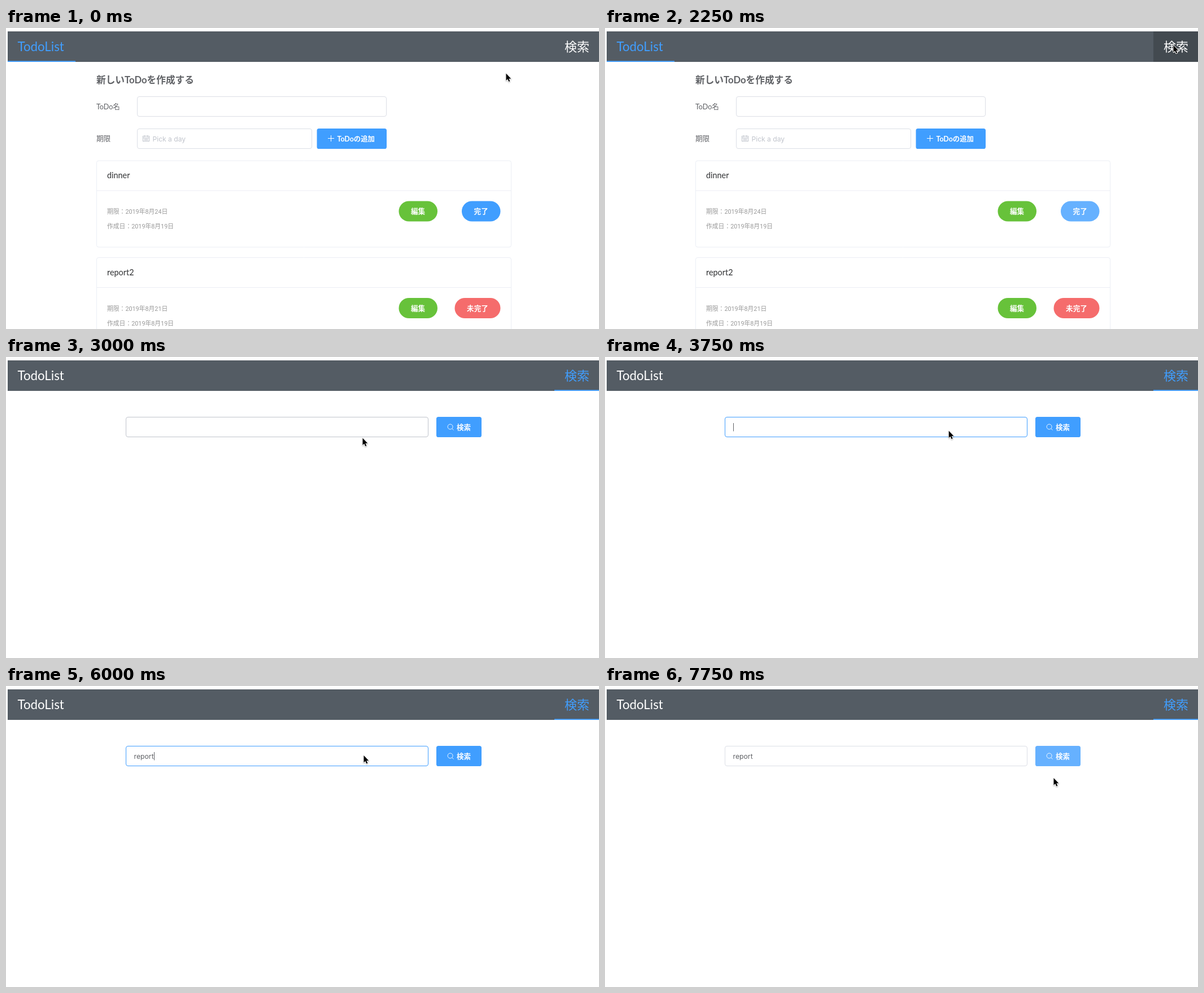
Write an HTML page with a canvas that moves like this. It is 1050x533 px and loops after 8 s.

```html
<!DOCTYPE html>
<html lang="ja">
<head>
<meta charset="utf-8">
<title>TodoList</title>
<style>
html, body { margin: 0; width: 100%; height: 100%; overflow: hidden; background: #fff; }
canvas { display: block; width: 1050px; height: 533px; }
</style>
</head>
<body>
<canvas id="stage" width="1050" height="533"></canvas>
<script>
const ctx = document.getElementById('stage').getContext('2d');
const LOOP = 8000, STEP = 250;

const CJK = '"Noto Sans CJK JP", "Noto Sans CJK", sans-serif';
const UI = 'Lato, ' + CJK;
const NUM = 'Roboto, ' + CJK;
const FIELD = 'Inter, ' + CJK;

const BLUE = '#409eff', LIGHT_BLUE = '#66b1ff', DARK_BLUE = '#3a8ee6';
const GREEN = '#67c23a', RED = '#f56c6c';
const BAR = '#545c64', BAR_HOVER = '#434a50';
const LINE = '#dcdfe6', LINE_HOVER = '#c0c4cc', CARD = '#ebeef5';
const INK = '#606266', DIM = '#999999';

// Pointer path: time, x, y
const PATH = [
  [250, 885.5, 80.5], [1500, 1003.5, 41.5], [2000, 1006.5, 30.5],
  [2500, 1006.5, 30.5], [2750, 990, 29.5], [3000, 631.5, 143.5],
  [3500, 612, 128], [4000, 605.5, 133.5], [5750, 605.5, 133.5],
  [6000, 633.5, 123], [6500, 798, 127], [6750, 799, 129],
  [7000, 796, 143], [7250, 796, 143], [7750, 794.5, 163]
];

function pointer(t) {
  const next = PATH.findIndex(p => p[0] > t);
  if (next === 0) return PATH[0].slice(1);
  if (next < 0) return PATH[PATH.length - 1].slice(1);
  const [t0, x0, y0] = PATH[next - 1], [t1, x1, y1] = PATH[next];
  const u = (t - t0) / (t1 - t0), k = u * u * (3 - 2 * u);
  return [x0 + (x1 - x0) * k, y0 + (y1 - y0) * k];
}

function text(str, x, y, size, color, family = UI, weight = 400) {
  ctx.font = `${weight} ${size}px ${family}`;
  ctx.fillStyle = color;
  ctx.fillText(str, x, y);
}

function rect(x, y, w, h, color) {
  ctx.fillStyle = color;
  ctx.fillRect(x, y, w, h);
}

function pill(x, y, w, h, r, color) {
  ctx.beginPath();
  ctx.roundRect(x, y, w, h, r);
  ctx.fillStyle = color;
  ctx.fill();
}

function frame(x, y, w, h, color) {
  ctx.beginPath();
  ctx.roundRect(x + 0.5, y + 0.5, w - 1, h - 1, 3.5);
  ctx.strokeStyle = color;
  ctx.lineWidth = 1;
  ctx.stroke();
}

function strokes(color, width, ...lines) {
  ctx.strokeStyle = color;
  ctx.lineWidth = width;
  ctx.beginPath();
  for (const [x0, y0, x1, y1] of lines) {
    ctx.moveTo(x0, y0);
    ctx.lineTo(x1, y1);
  }
  ctx.stroke();
}

function header(search, hover) {
  rect(3, 6, 1047, 54, BAR);
  if (hover) rect(971, 6, 79, 54, BAR_HOVER);
  if (search) rect(971, 58.2, 79, 1.8, BLUE);
  else rect(3, 58.2, 120, 1.8, BLUE);
  text('TodoList', 20.5, 41, 22.3, search ? '#fff' : BLUE);
  text('検索', 989, 41, 22, search ? BLUE : '#fff');
}

function calendar(x, y) {
  ctx.strokeStyle = LINE_HOVER;
  ctx.lineWidth = 1;
  ctx.strokeRect(x + 0.5, y + 1.5, 11, 9);
  strokes(LINE_HOVER, 1, [x, y + 4.5, x + 12, y + 4.5],
    [x + 3.5, y, x + 3.5, y + 3], [x + 8.5, y, x + 8.5, y + 3],
    [x + 2.5, y + 6.5, x + 9.5, y + 6.5], [x + 2.5, y + 8.5, x + 9.5, y + 8.5]);
}

function card(y, title, due, label, x, color) {
  frame(160, y, 735, 154, CARD);
  rect(161, y + 53, 733, 1, CARD);
  text(title, 179, y + 31.5, 14.4, '#303133');
  text('期限：' + due, 179, y + 94.5, 10.8, DIM, NUM);
  text('作成日：2019年8月19日', 179, y + 120.5, 10.8, DIM, NUM);
  pill(695.5, y + 72, 68.5, 36, 18, GREEN);
  text('編集', 717, y + 94.5, 12.6, '#fff', UI, 700);
  pill(x, y + 72, 875.5 - x, 36, 18, color);
  text(label, x + 21.6, y + 94.5, 12.6, '#fff', UI, 700);
}

function listPage(t) {
  text('新しいToDoを作成する', 160, 98, 16.7, INK, UI, 700);
  text('ToDo名', 160, 143.5, 12.5, INK);
  frame(232, 121, 442, 36, LINE);
  text('期限', 160, 200, 12.6, INK);
  frame(232, 178, 310, 36, LINE);
  calendar(242, 190);
  text('Pick a day', 259.5, 200.5, 12.1, LINE_HOVER, FIELD);
  pill(550.5, 178, 123.5, 36, 3.6, BLUE);
  strokes('#fff', 1, [570, 195.5, 581, 195.5], [575.5, 190, 575.5, 201]);
  text('ToDoの追加', 586.5, 200.5, 12.4, '#fff', UI, 700);
  card(234.5, 'dinner', '2019年8月24日', '完了', 807, t < 500 ? BLUE : LIGHT_BLUE);
  card(406, 'report2', '2019年8月21日', '未完了', 794.5, RED);
}

function searchPage(t) {
  const focus = t >= 3750 && t < 6750;
  const over = t >= 3000 && t < 3750;
  const typed = t < 4750 ? '' : 'report'.slice(0, 2 + Math.floor((t - 4750) / STEP));
  const caret = focus && (t < 4250 || (t >= 4750 && t < 6500));
  frame(212, 106, 536, 36, focus ? BLUE : over ? LINE_HOVER : LINE);
  text(typed, 226.6, 128.5, 12.2, INK, FIELD);
  if (caret) rect(Math.round(226.6 + ctx.measureText(typed).width), 117, 1, 14.5, INK);

  const button = t < 6500 ? BLUE : t === 6750 ? DARK_BLUE : LIGHT_BLUE;
  pill(762, 106, 80, 36, 3.6, button);
  ctx.strokeStyle = '#fff';
  ctx.lineWidth = 0.9;
  ctx.beginPath();
  ctx.arc(786.6, 123.5, 4.5, 0, Math.PI * 2);
  ctx.stroke();
  strokes('#fff', 0.9, [789.8, 126.7, 792.6, 129.5]);
  text('検索', 798, 128.7, 12.6, '#fff', UI, 700);
}

const ARROW = new Path2D('M0 0V12.6L2.8 10 4.8 14.6 6.9 13.7 4.9 9.3H8.8Z');

function arrow(x, y) {
  ctx.save();
  ctx.translate(x, y);
  ctx.lineJoin = 'round';
  ctx.shadowColor = 'rgba(0,0,0,.3)';
  ctx.shadowBlur = 2;
  ctx.shadowOffsetY = 1;
  ctx.strokeStyle = '#fff';
  ctx.lineWidth = 1.8;
  ctx.stroke(ARROW);
  ctx.shadowColor = 'transparent';
  ctx.fillStyle = '#000';
  ctx.fill(ARROW);
  ctx.restore();
}

function draw(t) {
  const search = t >= 2500;
  rect(0, 0, 1050, 533, '#fff');
  header(search, t >= 1750 && t < 2750);
  if (search) searchPage(t);
  else listPage(t);
  arrow(...pointer(t));
}

const start = performance.now();
function tick() {
  const t = (performance.now() - start) % LOOP;
  draw(Math.floor(t / STEP) * STEP);
  requestAnimationFrame(tick);
}
tick();
</script>
</body>
</html>
```
